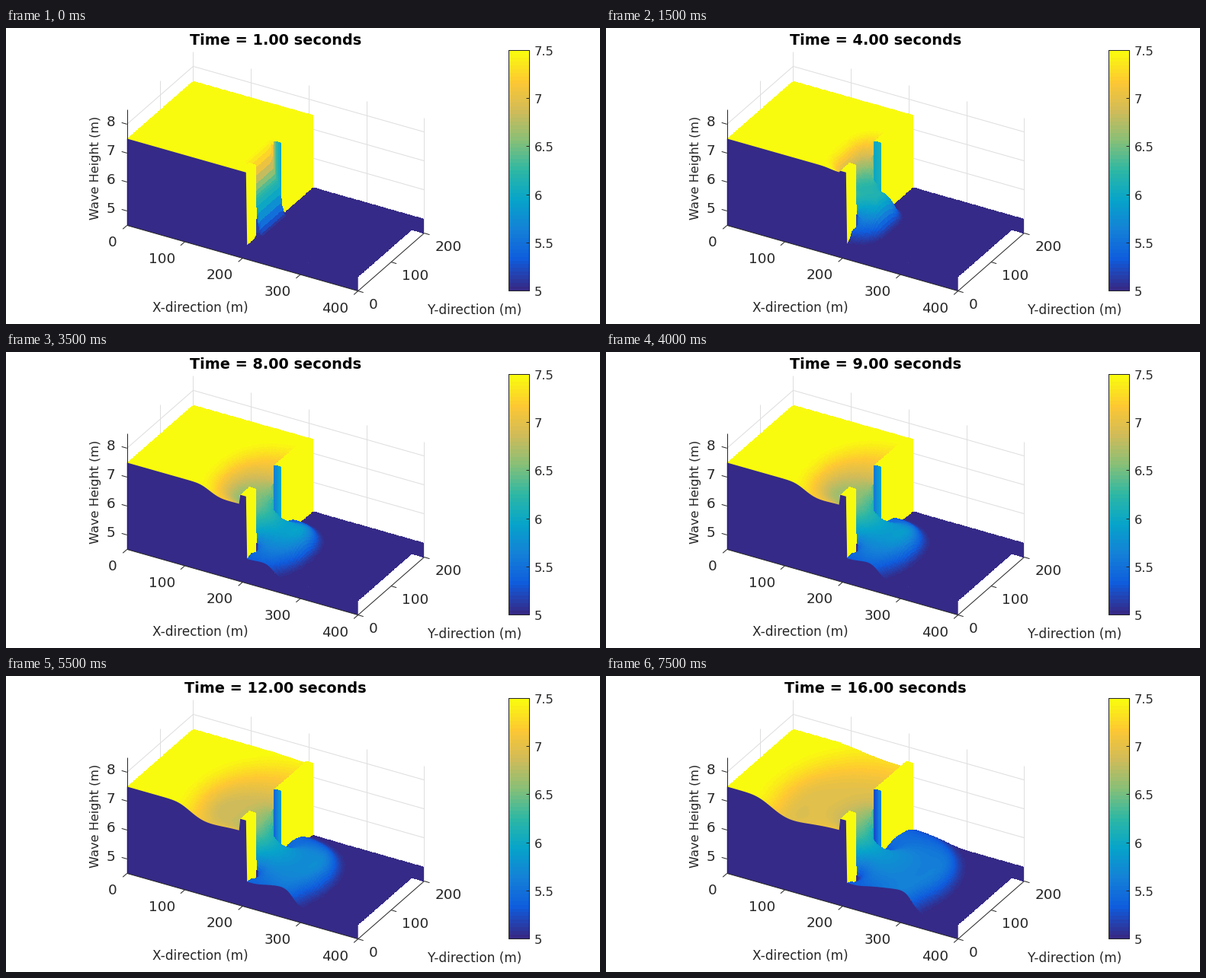
These frames come from a looping animation (779 by 389 pixels, 8 s). A matplotlib script:

```python
import numpy as np
import matplotlib.pyplot as plt
from matplotlib.animation import ArtistAnimation
from matplotlib.colors import LinearSegmentedColormap

W, H, DPI = 779, 389, 64
SECONDS, STEP_MS = 16, 500
G, DX, DT = 9.81, 2.0, 0.05
DEEP, SHALLOW, FLOOR, TOP = 7.5, 5.0, 4.5, 8.5
INK = (0.15, 0.15, 0.15)
PARULA = "#352a87 #0f5cdd #1481d6 #06a4ca #2eb7a4 #87bf77 #d1bb59 #fec832 #f9fb0e"
CMAP = LinearSegmentedColormap.from_list("parula", PARULA.split(), N=64)


# ---- shallow water solver ----
xs = np.arange(0, 401, DX)
ys = np.arange(0, 201, DX)
X, Y = np.meshgrid(xs, ys)
DAM = (X >= 196) & (X <= 206) & ((Y < 29) | (Y > 103))
MIRROR = np.array([1, -1, 1])[:, None, None]


def physical(q):
    h, m, n = q
    u = m / h
    return np.stack([m, m * u + G * h * h / 2, n * u]), np.abs(u) + np.sqrt(G * h)


def net_flux(q, solid):
    """Rusanov flux difference along the last axis: the dam reflects, the edges are open."""
    q = np.pad(q, ((0, 0), (0, 0), (1, 1)), mode="edge")
    solid = np.pad(solid, ((0, 0), (1, 1)), constant_values=False)
    a, b = q[..., :-1], q[..., 1:]
    left = np.where(solid[:, :-1], b * MIRROR, a)
    right = np.where(solid[:, 1:], a * MIRROR, b)
    (fl, sl), (fr, sr) = physical(left), physical(right)
    f = (fl + fr - np.maximum(sl, sr) * (right - left)) / 2
    return f[..., 1:] - f[..., :-1]


def advance(q):
    fx = net_flux(q, DAM)
    fy = net_flux(q[[0, 2, 1]].transpose(0, 2, 1), DAM.T).transpose(0, 2, 1)[[0, 2, 1]]
    return np.where(DAM, q, q - DT / DX * (fx + fy))


def heights():
    q = np.zeros((3,) + X.shape)
    q[0] = np.where((X <= 200) | DAM, DEEP, SHALLOW)
    for _ in range(SECONDS):
        for _ in range(round(1 / DT)):
            q = advance(q)
        yield q[0].copy()


# ---- drawing ----
def project(x, y, z):
    return (158.7 + 0.7575 * x + 0.4338 * y,
            259.4 + 0.2155 * x - 0.38 * y - 38 * (z - FLOOR))


fig = plt.figure(figsize=(W / DPI, H / DPI), dpi=DPI, facecolor="white")
ax = fig.add_axes([0, 0, 1, 1])
ax.axis("off")


def pt(px):
    return px * 72 / DPI


def line(pts, color=INK, z=3):
    ax.plot(*zip(*pts), color=color, lw=pt(1), zorder=z, solid_capstyle="butt")


def label(x, y, s, size, **kw):
    return ax.text(x, y, s, fontsize=pt(size), family="DejaVu Sans",
                   **{"color": INK, "ha": "center", "va": "baseline", **kw})


def tick(p, dx, dy):
    line([p, (p[0] + dx, p[1] + dy)])


def draw_axes():
    grey = (0.87,) * 3
    for x in range(0, 401, 100):
        line([project(x, 200, FLOOR), project(x, 200, TOP)], grey, 1)
    line([project(0, 100, FLOOR), project(0, 100, TOP)], grey, 1)
    for z in range(5, 9):
        line([project(0, 0, z), project(0, 200, z), project(400, 200, z)], grey, 1)

    line([project(0, 0, FLOOR), project(0, 0, TOP)])
    line([project(0, 0, FLOOR), project(400, 0, FLOOR), project(400, 200, FLOOR)])
    for x in range(0, 401, 100):
        p = project(x, 0, FLOOR)
        tick(p, -5.5, 4.8)
        label(p[0] - (19 if x == 0 else 30), p[1] + 28, str(x), 18.4)
    for y in range(0, 201, 100):
        p = project(400, y, FLOOR)
        tick(p, 7, 2)
        label(p[0] + 14, p[1] + 23, str(y), 18.4, ha="left")
    for z in range(5, 9):
        p = project(0, 0, z)
        tick(p, -7, -2)
        label(143, p[1] + 3, str(z), 18.4, ha="right")
    label(255, 373, "X-direction (m)", 16.9)
    label(614.5, 376, "Y-direction (m)", 16.9)
    label(125.5, 183.5, "Wave Height (m)", 16.1, rotation=90, va="center", ha="right")


def draw_colorbar():
    x0, x1, y0, y1 = 659, 686, 29, 345
    ax.pcolormesh([x0, x1], np.linspace(y1, y0, 65), np.arange(64)[:, None],
                  cmap=CMAP, zorder=2)
    line([(x0, y0), (x1, y0), (x1, y1), (x0, y1), (x0, y0)])
    for k in range(6):
        y = y1 + (y0 - y1) * k / 5
        tick((x1, y), -4, 0)
        label(693, y + 7, f"{5 + k / 2:g}", 16.4, ha="left")


def surface(h):
    # One extra row closes the sheet down to the floor at the far side
    px, py = project(np.vstack([X, X[-1]]), np.vstack([Y, Y[-1]]),
                     np.vstack([h, np.full_like(xs, FLOOR)]))
    # Far rows first, so that nearer ones cover them
    sheet = ax.pcolormesh(px[::-1], py[::-1] + 0.4, h[::-1, :-1], cmap=CMAP,
                          vmin=SHALLOW, vmax=DEEP, shading="flat", zorder=2)
    x, z = np.r_[xs, 400, 0], np.r_[h[0], FLOOR, FLOOR]
    curtain, = ax.fill(*project(x, 0, z), color=CMAP(0), lw=0, zorder=2.5)
    return [sheet, curtain]


draw_axes()
draw_colorbar()
frames = [surface(h) + [label(353.5, 22, f"Time = {t:.2f} seconds", 19.3,
                              weight="bold", color="black")]
          for t, h in enumerate(heights(), 1)]
ax.set_xlim(0, W)
ax.set_ylim(H, 0)

anim = ArtistAnimation(fig, frames, interval=STEP_MS, repeat=True, repeat_delay=0)
plt.show()
```
